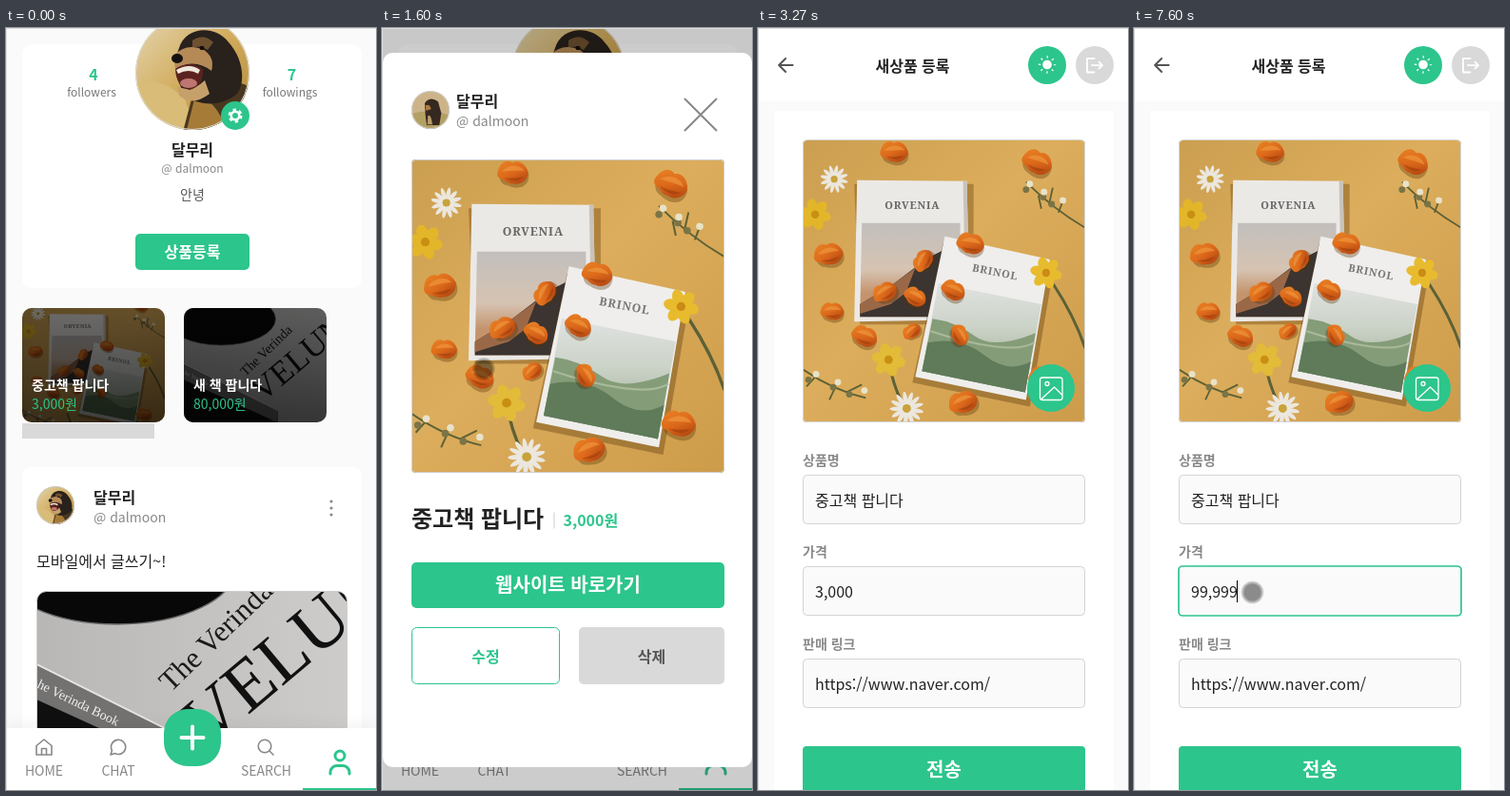
Write an HTML page that moves like this. It is 389 px wide and 800 px high and loops after 8000 ms.

```html
<!DOCTYPE html>
<html lang="ko">
<head>
<meta charset="utf-8">
<title>새상품 등록</title>
<style>
html, body { margin: 0; width: 100%; height: 100%; overflow: hidden; background: #fafafa; }
svg { display: block; }
.stage { width: 389px; height: 800px; }
text { font-family: "Noto Sans CJK KR", "Noto Sans KR", "Noto Sans CJK", "Noto Sans CJK JP", sans-serif; font-size: 16px; fill: #222; white-space: pre; }
.serif { font-family: "Noto Serif", "Liberation Serif", serif; }
.times { font-family: "Liberation Serif", "Noto Serif", serif; }
.b { font-weight: 700; }
.mid { text-anchor: middle; }
.s12 { font-size: 12px; } .s14 { font-size: 14px; } .s20 { font-size: 20px; } .s24 { font-size: 24px; }
.green { fill: #2cc58c; } .white { fill: #fff; } .gray { fill: #888; } .hint { fill: #b5b5b5; } .red { fill: #dc4030; }
.line { fill: none; stroke: #888; stroke-width: 1.6; stroke-linecap: round; stroke-linejoin: round; }
.box { fill: #fafafa; stroke: #d3d3d3; }

.modal, .content, .form, .early, .late, .noPhoto, .photo, .shift, .drop, .cam, .send, .bad, .focus, .show { animation: 8s step-end infinite; }
.modal { animation-name: modal; }
.content { animation-name: content; }
.form { animation-name: form; }
.early { animation-name: early; }
.late { animation-name: late; }
.noPhoto { animation-name: noPhoto; }
.photo { animation-name: photo; }
.shift { animation-name: shift; }
.drop { animation-name: drop; }
.cam { animation-name: cam; }
.send { animation-name: send; }
.bad { animation-name: bad; }
.focus { animation-name: focus; }
.show { animation-name: show; }
.cursor { animation: move 8s linear infinite; }

@keyframes modal { 0% { opacity: 0 } 17.5% { opacity: 1 } 34.125%, 100% { opacity: 0 } }
@keyframes content { 0% { opacity: 0 } 20%, 100% { opacity: 1 } }
@keyframes form { 0% { opacity: 0 } 34.125%, 100% { opacity: 1 } }
@keyframes early { 0% { opacity: 1 } 37.5%, 100% { opacity: 0 } }
@keyframes late { 0% { opacity: 0 } 37.5%, 100% { opacity: 1 } }
@keyframes noPhoto { 0% { opacity: 1 } 40.875%, 100% { opacity: 0 } }
@keyframes photo { 0% { opacity: 0 } 40.875%, 100% { opacity: 1 } }
@keyframes shift { 0% { transform: translateY(-73px) } 37.5% { transform: translateY(-95px) } 40.875%, 100% { transform: none } }
@keyframes drop { 0% { transform: none } 70.875% { transform: translateY(22px) } 82.5%, 100% { transform: none } }
@keyframes cam { 0% { transform: translateY(-95px) } 40.875%, 100% { transform: none } }
@keyframes send { 0% { fill: #82dcb7 } 37.5% { fill: #2cc58c } 70.875% { fill: #82dcb7 } 82.5%, 100% { fill: #2cc58c } }
@keyframes bad { 0% { opacity: 0 } 70.875% { opacity: 1 } 82.5%, 100% { opacity: 0 } }
@keyframes focus { 0% { opacity: 0 } 52.5%, 100% { opacity: 1 } }
@keyframes show { 0% { opacity: 0 } 5% { opacity: 1 } 26.625% { opacity: 0 } 28.375% { opacity: 1 } 40.875% { opacity: 0 } 45.875%, 100% { opacity: 1 } }
@keyframes move {
  0%, 5% { transform: translate(10px, 240px) }
  9.125%, 10.5% { transform: translate(153px, 403px) }
  11.6%, 15% { transform: translate(92px, 360px) }
  15.8%, 24.6% { transform: translate(107px, 358px) }
  26.6% { transform: translate(200px, 430px) }
  28.3% { transform: translate(138px, 666px) }
  30%, 40.8% { transform: translate(134.5px, 668.5px) }
  45.8%, 48% { transform: translate(136.5px, 575.5px) }
  50%, 100% { transform: translate(124.5px, 592.5px) }
}
</style>
</head>
<body>
<svg class="stage" viewBox="0 0 389 800">
<defs>
  <linearGradient id="gold" x2="1" y2="1"><stop stop-color="#cb9f50"/><stop offset=".45" stop-color="#dcad5c"/><stop offset="1" stop-color="#cd9c4b"/></linearGradient>
  <linearGradient id="dusk" x2="0" y2="1"><stop stop-color="#c2bfbd"/><stop offset=".5" stop-color="#d6c3b2"/><stop offset=".75" stop-color="#c4936c"/></linearGradient>
  <linearGradient id="hill" x2="0" y2="1"><stop stop-color="#e0e2e0"/><stop offset=".4" stop-color="#ccd3c8"/><stop offset="1" stop-color="#8fa384"/></linearGradient>
  <linearGradient id="ember" x2="1" y2="1"><stop stop-color="#ea8526"/><stop offset=".5" stop-color="#dd6a1b"/><stop offset="1" stop-color="#a93c0c"/></linearGradient>
  <linearGradient id="shade" x2="0" y2="1"><stop stop-opacity=".54"/><stop offset="1" stop-opacity=".74"/></linearGradient>
  <linearGradient id="paper" x2="1" y2="0"><stop stop-color="#b9b7b6"/><stop offset="1" stop-color="#cfcdcc"/></linearGradient>
  <linearGradient id="grass" x2="1" y2="1"><stop stop-color="#e4d7b4"/><stop offset=".5" stop-color="#d2ac5c"/><stop offset="1" stop-color="#b08838"/></linearGradient>
  <clipPath id="round"><circle cx="60" cy="60" r="60"/></clipPath>
  <clipPath id="tile1"><rect x="17" y="294" width="150" height="120" rx="10"/></clipPath>
  <clipPath id="tile2"><rect x="187" y="294" width="150" height="120" rx="10"/></clipPath>
  <clipPath id="post"><rect x="32.500" y="591.500" width="326" height="300" rx="10"/></clipPath>
  <clipPath id="big"><rect x="31" y="138" width="329" height="329" rx="4"/></clipPath>
  <clipPath id="prev"><rect x="47" y="118" width="297" height="296" rx="4"/></clipPath>

  <g id="petal">
    <path d="M-13 5C-14-6-4-9 4-8 14-9 18 0 16 7 13 15 4 16-3 14-8 14-12 11-13 5z" fill="#5a3308" opacity=".35"/>
    <path d="M-15 1C-14-8-8-12-2-9 3-14 12-10 15-2 16 5 9 12 2 11-3 13-6 9-10 9-14 8-16 6-15 1z" fill="url(#ember)"/>
    <path d="M-11 1C-6-7 5-9 11-3 5-3-4 0-11 1z" fill="#f3a046" opacity=".55"/>
    <path d="M-8 7C0 7 6 4 11 3 7 9 0 10-8 7z" fill="#8f330b" opacity=".45"/>
  </g>

  <symbol id="books" viewBox="0 0 296 296" preserveAspectRatio="xMidYMid slice">
    <rect width="296" height="296" fill="url(#gold)"/>
    <g fill="none" stroke="#5d6136" stroke-width="1.800">
      <path d="M262 150Q285 185 296 218" stroke-width="3"/>
      <path d="M234 44Q262 72 296 92M258 68L262 50M247 58L250 72M268 76L274 60"/>
      <path d="M0 240Q32 262 66 270M14 247L4 258M34 259L28 272M46 264L62 256"/>
      <path d="M90 230Q94 255 104 275" stroke-width="3"/>
    </g>
    <path d="M54 46H179V193H60z" fill="#6b4513" opacity=".4"/>
    <path d="M57 42L172 43 175 188 54 190z" fill="#ebe9e6"/>
    <path d="M172 43L175 188 171 188 168 43z" fill="#c9c3ba"/>
    <path d="M62 87H165V185H60z" fill="url(#dusk)"/>
    <path d="M60 172L96 150 130 124 166 106V185H60z" fill="#3b3430"/>
    <path d="M60 172L96 150 118 134 108 160 92 172 60 182z" fill="#9a6847"/>
    <text class="serif b mid" x="115" y="72" style="font-size:11px;letter-spacing:.8px;fill:#666">ORVENIA</text>
    <path d="M147 108L263 134 238 279 115 254z" fill="#5f3c10" opacity=".4"/>
    <path d="M149 101L259 125 234 272 118 248z" fill="#efeeec"/>
    <path d="M142 150L250 172 233 264 125 242z" fill="url(#hill)"/>
    <path d="M136 187Q160 190 180 205T244 202L233 264 125 242z" fill="#859c78"/>
    <path d="M131 212Q165 205 190 225T239 232L233 264 125 242z" fill="#5f7b59"/>
    <path d="M134 200Q170 212 200 216T243 212" fill="none" stroke="#a9b99b" stroke-width="2"/>
    <text class="serif b mid" transform="translate(201 142) rotate(11)" style="font-size:11px;letter-spacing:.8px;fill:#777">BRINOL</text>
    <g id="blooms"></g>
  </symbol>

  <g id="desk">
    <rect y="-60" width="340" height="300" fill="url(#paper)"/>
    <ellipse cx="85" cy="-25" rx="125" ry="60" fill="#080808" stroke="#6a6a6a" stroke-width="1.500"/>
    <path d="M0 78L215 185V240H0z" fill="#101010"/>
    <path d="M0 78L215 185V212L0 114z" fill="#737271"/>
    <path d="M0 77L215 184" stroke="#e4e2e0" stroke-width="2"/>
    <text class="times" transform="translate(0 101) rotate(26)" style="font-size:14px;fill:#f2f2f2">he Verinda Book</text>
    <text class="times" transform="translate(141 107) rotate(-44)" style="font-size:31px;fill:#1a1a1a">The Verinda</text>
    <text class="times" transform="translate(180 166) rotate(-40)" style="font-size:76px;fill:#111">VELUN</text>
  </g>

  <g id="dog" clip-path="url(#round)">
    <rect width="120" height="120" fill="url(#grass)"/>
    <path d="M0 74Q24 60 52 88L64 120H0z" fill="#d8bc78"/>
    <path d="M60 84Q100 58 124 78V122H50z" fill="#4a371f"/>
    <path d="M62 88Q82 82 96 120H54z" fill="#a67b38"/>
    <path d="M46 34C52 13 82 8 98 28 112 43 117 68 107 82 93 94 70 96 57 86 43 76 39 50 46 34z" fill="#28211c"/>
    <path d="M60 26Q72 18 82 28L76 36Q68 30 60 34z" fill="#6f5130"/>
    <path d="M40 42Q54 28 72 36 84 44 80 58 62 44 42 56z" fill="#b58a57"/>
    <path d="M44 74Q58 82 73 68L78 82Q60 96 46 84z" fill="#c6a06a"/>
    <path d="M42 56Q58 46 71 56 72 74 57 78 43 75 42 56z" fill="#5a231f"/>
    <ellipse cx="56" cy="71" rx="9" ry="5" fill="#bd7770"/>
    <path d="M43 57Q57 49 68 57L66 61Q56 55 45 61z" fill="#efe7da"/>
    <ellipse cx="44" cy="45" rx="6" ry="5" fill="#151111"/>
    <ellipse cx="70" cy="34" rx="2.500" ry="2.200" fill="#120e0c"/>
  </g>
  <g id="pup" clip-path="url(#round)">
    <rect width="120" height="120" fill="#cdb488"/>
    <path d="M0 72Q60 56 120 76V120H0z" fill="#b3a063"/>
    <path d="M42 38Q60 16 84 34L94 70 88 108H48L44 76z" fill="#352821"/>
    <path d="M44 46Q58 40 62 58L46 62z" fill="#b07a42"/>
    <path d="M52 78Q62 72 66 106H50z" fill="#b99a6c"/>
  </g>
</defs>

<!-- profile -->
<rect width="389" height="800" fill="#fafafa"/>
<rect x="17" y="17" width="357" height="256" rx="10" class="white"/>
<use href="#dog" x="136" y="-13"/>
<circle cx="196" cy="47" r="59.500" fill="none" stroke="#ddd"/>
<circle cx="241" cy="92" r="15" class="green"/>
<g fill="none" stroke="#fff" transform="translate(241 92)">
  <circle r="4.300" stroke-width="2.600"/>
  <circle r="6.300" stroke-width="2.400" stroke-dasharray="3.300 3.300"/>
</g>
<text x="92" y="55" class="b mid green">4</text>
<text x="90" y="72" class="s12 mid" style="fill:#777">followers</text>
<text x="300.500" y="55" class="b mid green">7</text>
<text x="298.500" y="72" class="s12 mid" style="fill:#777">followings</text>
<text x="196" y="134" class="b mid">달무리</text>
<text x="196" y="152" class="s12 mid gray">@ dalmoon</text>
<text x="196" y="180" class="s14 mid" style="fill:#555">안녕</text>
<rect x="136" y="216" width="120" height="38" rx="5" class="green"/>
<text x="196" y="241" class="b mid white">상품등록</text>

<g clip-path="url(#tile1)">
  <use href="#books" x="17" y="294" width="150" height="120"/>
  <rect x="17" y="294" width="150" height="120" fill="url(#shade)"/>
</g>
<g clip-path="url(#tile2)">
  <use href="#desk" transform="translate(187 317) scale(.459)"/>
  <rect x="187" y="294" width="150" height="120" fill="url(#shade)"/>
</g>
<text x="27" y="380" class="s14 b white">중고책 팝니다</text>
<text x="27" y="400" class="s14 green" font-weight="500">3,000원</text>
<text x="197" y="380" class="s14 b white">새 책 팝니다</text>
<text x="197" y="400" class="s14 green" font-weight="500">80,000원</text>
<rect x="17" y="415" width="139" height="16" fill="#d9d9d9"/>

<rect x="17" y="461" width="357" height="400" rx="10" class="white"/>
<use href="#dog" transform="translate(32 481) scale(.333)"/>
<circle cx="52" cy="501" r="19.500" fill="none" stroke="#ccc"/>
<text x="92" y="498.500" class="b">달무리</text>
<text x="92" y="519" class="s14 gray">@ dalmoon</text>
<g class="gray"><circle cx="342" cy="497" r="1.600"/><circle cx="342" cy="504" r="1.600"/><circle cx="342" cy="511" r="1.600"/></g>
<text x="32" y="566">모바일에서 글쓰기~!</text>
<g clip-path="url(#post)"><use href="#desk" transform="translate(32 591)"/></g>
<rect x="32.500" y="591.500" width="326" height="300" rx="10" fill="none" stroke="#ccc"/>

<rect y="735" width="389" height="65" class="white" style="filter:drop-shadow(0 -3px 8px rgba(0,0,0,.05))"/>
<g class="line">
  <path d="M32 753.500l8-6.500 8 6.500v9.500H32zM37.500 763v-6.500h5v6.500"/>
  <path d="M110 763l1.400-4.600a7.600 7.600 0 1 1 3.200 3.200z"/>
  <circle cx="272" cy="754" r="6.800"/><path d="M277 759l4 4"/>
</g>
<g font-weight="500">
  <text x="40" y="785" class="s14 mid gray">HOME</text>
  <text x="118" y="785" class="s14 mid gray">CHAT</text>
  <text x="273.500" y="785" class="s14 mid gray">SEARCH</text>
</g>
<rect x="166" y="715" width="60" height="60" rx="25" class="green"/>
<path d="M184.500 745h23M196 733.500v23" stroke="#fff" stroke-width="4" stroke-linecap="round"/>
<path d="M341 783v-2a7 7 0 0 1 7-6.500h6a7 7 0 0 1 7 6.500v2M356 764a5 5 0 1 0-10 0 5 5 0 1 0 10 0" class="line" style="stroke:#2cc58c;stroke-width:3"/>
<rect x="312" y="798" width="77" height="2" class="green"/>

<!-- product dialog -->
<g class="modal">
  <rect width="389" height="800" opacity=".2"/>
  <rect x="1" y="26" width="388" height="750" rx="10" class="white"/>
  <path d="M318.500 74.500l33 33M351.500 74.500l-33 33" class="line" style="stroke-width:2"/>
  <g class="content">
    <use href="#pup" transform="translate(31 66) scale(.333)"/>
    <circle cx="51" cy="86" r="19.500" fill="none" stroke="#ccc"/>
    <text x="78" y="83" class="b">달무리</text>
    <text x="78" y="103" class="s14 gray">@ dalmoon</text>
    <g clip-path="url(#big)"><use href="#books" x="31" y="138" width="329" height="329"/></g>
    <rect x="31.500" y="138.500" width="328" height="328" rx="4" fill="none" stroke="#ccc"/>
    <text x="31" y="523.500" class="b s24">중고책 팝니다</text>
    <path d="M181 508.500v17" stroke="#ccc"/>
    <text x="190.500" y="523" class="b green">3,000원</text>
    <rect x="31" y="561" width="329" height="48" rx="5" class="green"/>
    <text x="195.500" y="592" class="b s20 mid white">웹사이트 바로가기</text>
    <rect x="31.500" y="629.500" width="155" height="59" rx="5" fill="#fff" stroke="#2cc58c"/>
    <text x="109" y="666" class="b mid green">수정</text>
    <rect x="207" y="629" width="153" height="60" rx="5" fill="#d9d9d9"/>
    <text x="283.500" y="666" class="b mid" style="fill:#555">삭제</text>
  </g>
</g>

<!-- edit form -->
<g class="form">
  <rect width="389" height="800" fill="#fafafa"/>
  <rect width="389" height="77" class="white"/>
  <path d="M36.500 39H22M29 32l-7 7 7 7" class="line" style="stroke:#555;stroke-width:2"/>
  <text x="162.500" y="45.500" class="b mid">새상품 등록</text>
  <circle cx="304" cy="39" r="20" class="green"/>
  <g transform="translate(304 38.500)"><circle r="4.800" class="white"/><circle r="8" fill="none" stroke="#fff" stroke-width="2.400" stroke-dasharray="1.300 4.983" stroke-dashoffset=".65"/></g>
  <circle cx="354" cy="39" r="20" fill="#d9d9d9"/>
  <path d="M353.500 32H346v14.500h7.500M351 39.200h11M358.500 35.700l3.500 3.500-3.500 3.500" class="line" style="stroke:#fff;stroke-width:1.800"/>
  <rect x="17" y="87" width="357" height="313" class="white"/>
  <g class="shift">
    <rect x="17" y="300" width="357" height="533" class="white drop"/>
    <text x="47" y="458.500" class="s14 b gray">상품명</text>
    <rect x="47.500" y="469.500" width="296" height="51" rx="4" class="box"/>
    <text x="60" y="501.500" class="hint early">2~15자 이내여야 합니다.</text>
    <text x="60" y="501.500" class="late">중고책 팝니다</text>
    <text x="47" y="555" class="s14 b gray">가격</text>
    <rect x="47.500" y="565.500" width="296" height="51" rx="4" class="box"/>
    <rect x="47" y="565" width="297" height="52" rx="4" class="focus" fill="#fafafa" stroke="#2cc58c" stroke-width="1.700"/>
    <g class="bad">
      <rect x="47" y="565" width="297" height="52" rx="4" fill="#fafafa" stroke="#dc4030" stroke-width="1.700"/>
      <text x="47" y="644.500" class="s12 red">필수 입력사항을 입력해주세요.</text>
    </g>
    <text id="empty" x="60" y="598" class="hint">숫자만 입력 가능합니다.</text>
    <text id="price" x="60" y="598"></text>
    <rect id="caret" y="580" width="1" height="23"/>
    <g class="drop">
      <text x="47" y="651.500" class="s14 b gray">판매 링크</text>
      <rect x="47.500" y="662.500" width="296" height="51" rx="4" class="box"/>
      <text x="60" y="694.500" class="hint early">url을 입력해 주세요.</text>
      <text x="60" y="694.500" class="late">https://www.naver.com/</text>
      <rect x="47" y="754" width="297" height="49" rx="4" class="send"/>
      <text x="195.500" y="786" class="b s20 mid white">전송</text>
    </g>
  </g>
  <g class="noPhoto">
    <rect x="47.500" y="117.500" width="296" height="201" rx="4" fill="#fff" stroke="#d3d3d3"/>
    <text x="47" y="336.500" class="s12 red early">상품의 이미지를 업로드해주세요.</text>
  </g>
  <g class="photo">
    <g clip-path="url(#prev)"><use href="#books" x="47" y="118" width="297" height="296"/></g>
    <rect x="47.500" y="117.500" width="296" height="296" rx="4" fill="none" stroke="#d3d3d3"/>
  </g>
  <g class="cam">
    <circle cx="308" cy="378" r="25" class="green"/>
    <path d="M298 389.500l13.500-12.500 8.500 8.500M306 373.500a2 2 0 1 0-4 0 2 2 0 1 0 4 0M299 367h18.500a2.500 2.500 0 0 1 2.500 2.500V388a2.500 2.500 0 0 1-2.500 2.500H299a2.500 2.500 0 0 1-2.500-2.500V369.500A2.500 2.500 0 0 1 299 367" class="line" style="stroke:#fff;stroke-width:1.300"/>
  </g>
</g>

<path d="M0 .5H389M.5 0V800" stroke="#dedede"/>
<g class="show"><g class="cursor">
  <circle r="11.500" opacity=".24"/>
  <circle r="9.500" opacity=".27"/>
</g></g>
</svg>
<script>
const $ = id => document.getElementById(id);

// x, y, scale, turn
const petals = [
  [96, 12, .95, 10], [246, 23, 1.05, 30], [27, 119, 1, 0], [176, 108, .95, 20],
  [126, 126, .8, -50], [86, 159, .85, -20], [118, 164, .8, 40], [31, 179, .8, 10],
  [65, 205, .9, 30], [114, 200, .65, -30], [158, 157, .85, 35], [165, 204, .75, 70],
  [168, 274, 1, -10], [253, 249, 1.05, 15]
];
const petal = ([x, y, s, r]) =>
  `<use href="#petal" transform="translate(${x} ${y}) rotate(${r}) scale(${s})"/>`;

const flower = (x, y, n, size, width, fill, core) => {
  let s = `<g transform="translate(${x} ${y})">`;
  for (let i = 0; i < n; i++)
    s += `<ellipse cx="${size * .55}" rx="${size * .5}" ry="${width}" fill="${fill}" transform="rotate(${i * 360 / n + 12})"/>`;
  return s + `<circle r="${size * .26}" fill="${core}"/></g>`;
};

const buds = (x, y, dx, dy) => [0, 1, 2, 3, 4, 5].map(i =>
  `<circle cx="${x + dx * i + 4 * Math.sin(i * 4)}" cy="${y + dy * i + 5 * Math.cos(i * 3)}" r="3.4" fill="${i % 2 ? '#e8e2c8' : '#7a7446'}"/>`).join('');

$('blooms').innerHTML =
  buds(234, 47, 7, 4) + buds(6, 246, 11, 4) +
  flower(13, 78, 6, 16, 5.5, '#e3b62a', '#c98f14') +
  flower(255, 139, 6, 16, 5.5, '#e8bb2e', '#cc8a16') +
  flower(90, 230, 6, 17, 6, '#e2bb38', '#c98f14') +
  flower(33, 41, 12, 14, 2, '#ebe7de', '#c9a23a') +
  flower(109, 281, 13, 17, 2.3, '#ebe7de', '#c9a23a') +
  petals.map(petal).join('');

const typed = [
  [0, ''], [3000, '3,000'], [5200, '300'], [5330, '30'], [5400, '3'], [5600, ''],
  [6600, '9'], [6870, '99'], [7130, '999'], [7330, '9,999'], [7600, '99,999']
];
const blinks = [[4200, 4670], [5200, 5800], [6330, 8000]];
let start;

function draw(now) {
  start ??= now;
  const t = (now - start) % 8000;
  const value = typed.findLast(([at]) => t >= at)[1];
  const price = $('price');
  if (price.textContent !== value) price.textContent = value;
  $('empty').style.opacity = value ? 0 : 1;
  $('caret').style.opacity = blinks.some(([a, b]) => t >= a && t < b) ? 1 : 0;
  $('caret').setAttribute('x', Math.round(60 + (value ? price.getComputedTextLength() : 0)) - 1);
  requestAnimationFrame(draw);
}
requestAnimationFrame(draw);
</script>
</body>
</html>
```
